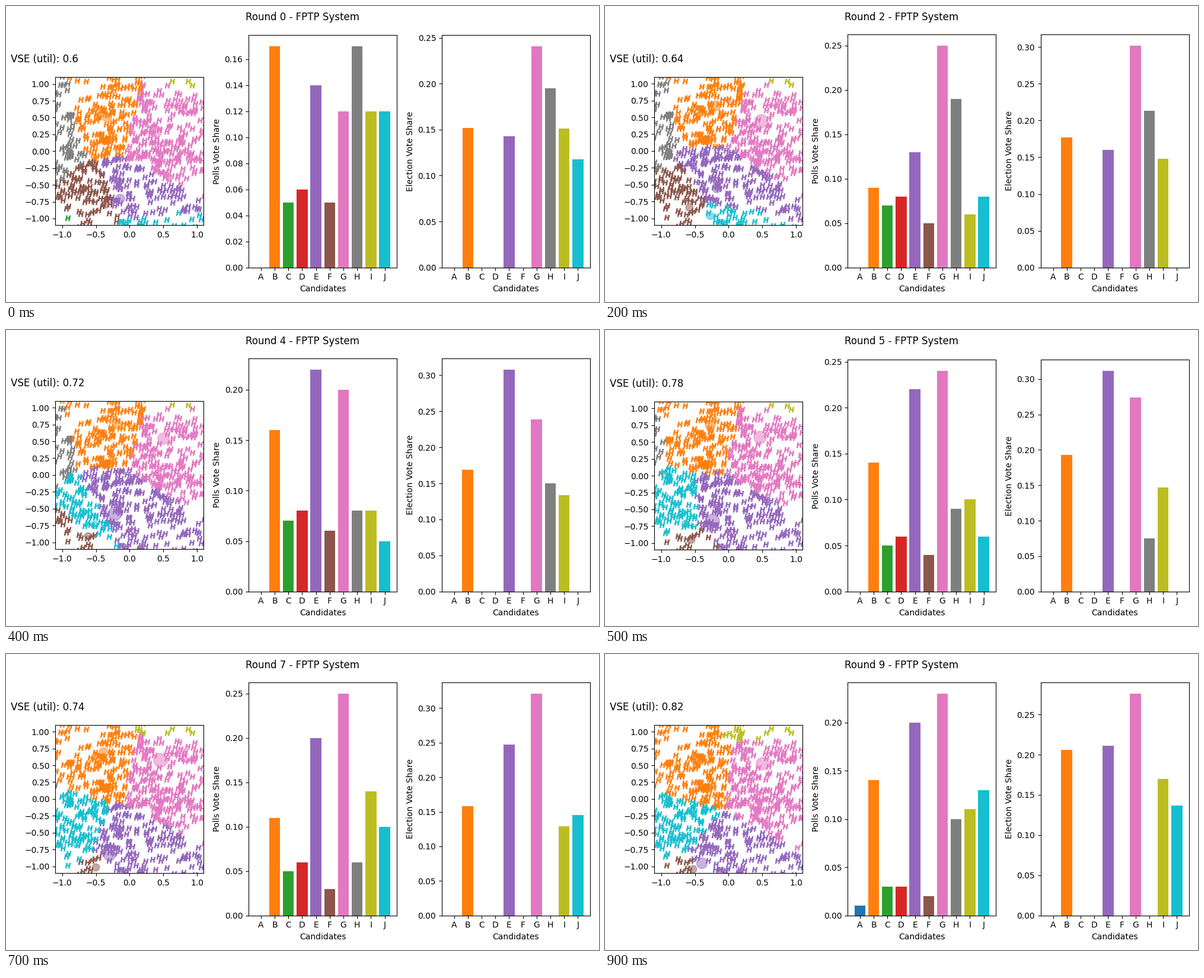
A matplotlib script that plays this animation: 1000x500 px, repeating every 1 s.

```python
import numpy as np
import matplotlib.pyplot as plt
from matplotlib.animation import FuncAnimation
from matplotlib.ticker import MultipleLocator

ROUNDS = 10
NAMES = list("ABCDEFGHIJ")
COLORS = {name: f"C{i}" for i, name in enumerate(NAMES)}

# Charted values at the key rounds; other rounds lie between them.
KEYS = [0, 2, 3, 4, 6, 7, 9]
VSE = [0.6, 0.64, 0.67, 0.72, 0.85, 0.74, 0.82]
POLLS = {  # percent; the minor candidates split the rest
    "B": [17, 9, 15, 16, 12, 11, 14],
    "E": [14, 13, 21, 22, 23, 20, 20],
    "G": [12, 25, 21, 20, 29, 25, 23],
    "H": [17, 19, 14, 8, 10, 6, 10],
    "I": [12, 6, 9, 8, 13, 14, 11],
    "J": [12, 8, 5, 5, 6, 10, 13],
}
VOTES = {  # per mille; G takes the rest
    "B": [152, 177, 147, 169, 216, 158, 206],
    "E": [143, 160, 262, 308, 315, 247, 211],
    "H": [195, 213, 201, 150, 0, 0, 0],
    "I": [151, 148, 141, 134, 160, 129, 170],
    "J": [118, 0, 0, 0, 0, 145, 137],
}
# Waypoints of each candidate, evenly spaced in time.
PATHS = {
    "B": [(-.34, .50), (-.12, .77), (-.35, .75), (-.48, .59)],
    "C": [(-1.06, -1.49), (-1.3, -4)],
    "E": [(-.14, -.70), (-.20, -.47), (-.26, -.77), (-.40, -.95)],
    "F": [(-.36, -.79), (-.69, -.86), (-.49, -1.0), (-.53, -1.04)],
    "G": [(.38, .29), (.53, .52), (.43, .60), (.50, .53)],
    "H": [(-1.2, .30), (-2.1, .62)],
    "I": [(.75, 1.75), (.43, 1.24)],
    "J": [(-.05, -1.35), (-.39, -.77), (-.78, -.68), (-.82, -.59)],
}

voters = np.random.default_rng(4).normal(0, 0.9, (1000, 2))
fig, (map_ax, poll_ax, vote_ax) = plt.subplots(1, 3, figsize=(10, 5), dpi=100)
title = fig.suptitle("")


def at(values, rnd):
    return float(np.interp(rnd, KEYS, values))


def position(path, rnd):
    times = np.linspace(0, ROUNDS - 1, len(path))
    return [np.interp(rnd, times, axis) for axis in zip(*path)]


def poll_shares(rnd):
    share = {n: round(at(v, rnd)) for n, v in POLLS.items()}
    # A stray supporter of A turns up every third round.
    share["A"] = int(rnd > 0 and rnd % 3 == 0)
    rest = 100 - sum(share.values())
    share["C"] = round(0.33 * rest)
    share["D"] = round(0.4 * rest)
    share["F"] = rest - share["C"] - share["D"]
    return {n: share[n] / 100 for n in NAMES}


def vote_shares(rnd):
    share = {n: at(v, rnd) / 1000 for n, v in VOTES.items()}
    share["G"] = 1 - sum(share.values())
    return {n: share.get(n, 0) for n in NAMES}


def draw_map(rnd, shares):
    ax = map_ax
    ax.clear()
    spots = np.array([position(path, rnd) for path in PATHS.values()])
    dist = np.linalg.norm(voters[:, None] - spots, axis=2)
    nearest = dist.argmin(axis=1)
    for i, (name, (x, y)) in enumerate(zip(PATHS, spots)):
        color = COLORS[name]
        ax.scatter(*voters[nearest == i].T, marker="$H$", color=color)
        ax.scatter(x, y, s=80 + 2000 * shares[name] ** 2, color=color,
                   alpha=0.5, zorder=2)
    ax.set(xlim=(-1.1, 1.1), ylim=(-1.1, 1.1), aspect="equal")
    ax.xaxis.set_major_locator(MultipleLocator(0.5))
    ax.text(-0.3, 1.1, f"VSE (util): {round(at(VSE, rnd), 2)}",
            fontsize=12, transform=ax.transAxes)


def draw_bars(ax, shares, label):
    ax.clear()
    ax.bar(NAMES, list(shares.values()), color=list(COLORS.values()))
    ax.set(xlabel="Candidates", ylabel=label)


def update(rnd):
    votes = vote_shares(rnd)
    title.set_text(f"Round {rnd} - FPTP System")
    draw_map(rnd, votes)
    draw_bars(poll_ax, poll_shares(rnd), "Polls Vote Share")
    draw_bars(vote_ax, votes, "Election Vote Share")
    # Start from the default grid so the fit never depends on the last round.
    fig.subplots_adjust(left=0.125, right=0.9, bottom=0.11, top=0.88,
                        wspace=0.2)
    fig.tight_layout()
    roomy = poll_ax.get_position().width > 0.247
    map_ax.yaxis.set_major_locator(MultipleLocator(0.25 if roomy else 0.5))
    return []


anim = FuncAnimation(fig, update, frames=ROUNDS, interval=100,
                     repeat=True, repeat_delay=0, blit=False)
plt.show()
```
